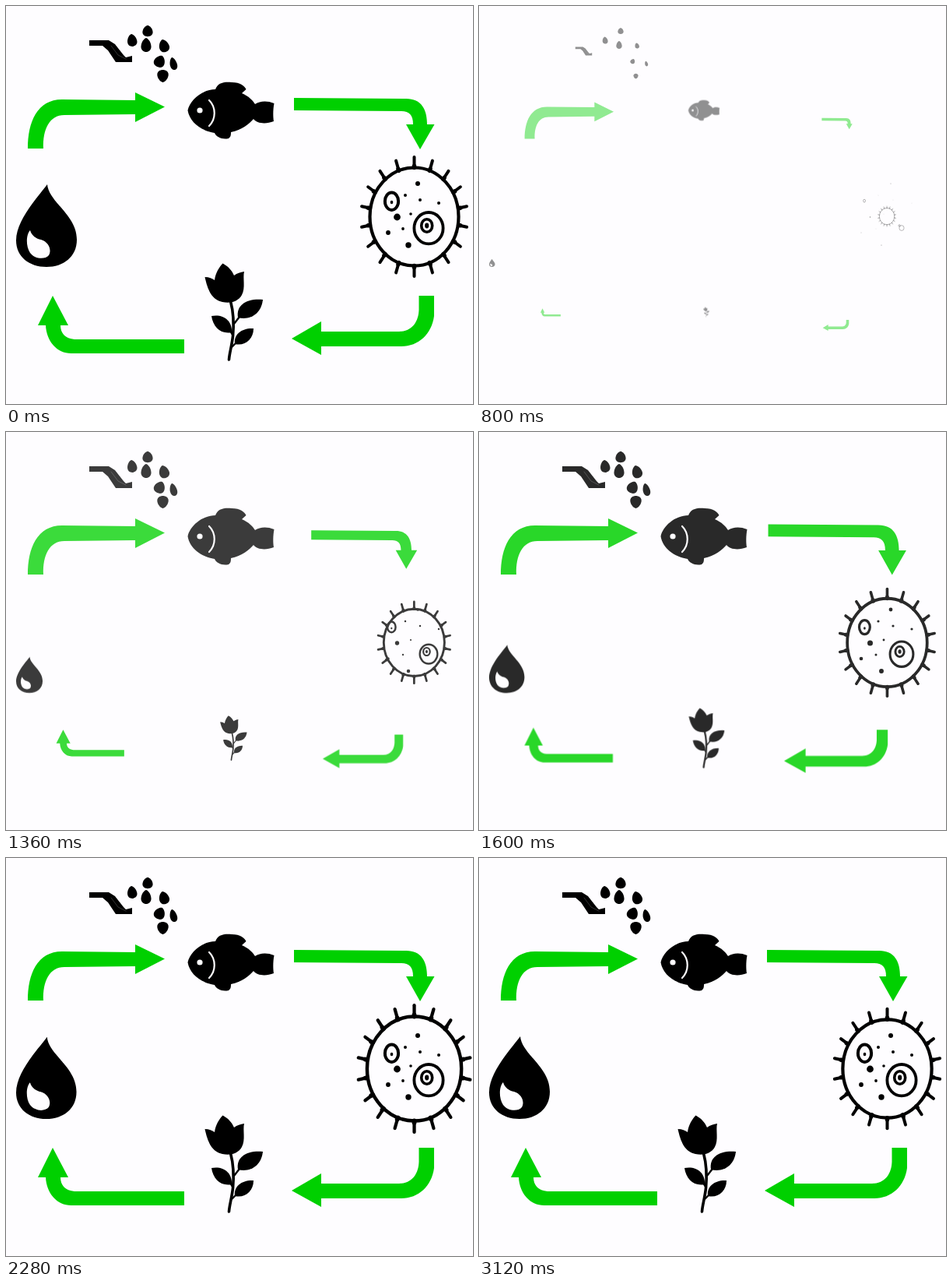
Write an HTML page that moves like this. It is 600x511 px and loops after 3.16 s.

```html
<!DOCTYPE html>
<html lang="en">
<head>
<meta charset="utf-8">
<title>Cycle of fish, microbes, plants and water</title>
<style>
  html, body { margin: 0; width: 100%; height: 100%; overflow: hidden; background: #fefdff; }
  svg { display: block; width: 100vw; height: 100vh; }
</style>
</head>
<body>
<svg viewBox="0 0 600 511"><g id="scene"></g></svg>
<script>
const LOOP = 3160, STEP = 40, START = 640;
const GREEN = '#00d000', BLACK = '#000', PAPER = '#fefdff';
const scene = document.getElementById('scene');
const parts = [];

// Value at time t on a list of [time, value] points.
function track(points, t) {
  let i = 1;
  while (i < points.length - 1 && t > points[i][0]) i++;
  const [t0, a] = points[i - 1], [t1, b] = points[i];
  const k = Math.min(1, Math.max(0, (t - t0) / (t1 - t0)));
  return a + (b - a) * k;
}

// Scale from `from` at START up to 1 at `end`; full size before START.
const grow = (from, end) => t => t < START ? 1 : track([[START, from], [end, 1]], t);

function add(x, y, scale, markup) {
  const g = document.createElementNS('http://www.w3.org/2000/svg', 'g');
  g.innerHTML = markup;
  scene.append(g);
  parts.push({ g, x, y, scale });
}

const shape = (d, fill = BLACK) => `<path d="${d}" fill="${fill}" fill-rule="evenodd"/>`;
const line = (d, width, color = BLACK) =>
  `<path d="${d}" fill="none" stroke="${color}" stroke-width="${width}" stroke-linecap="round"/>`;
const oval = (x, y, rx, ry, width = 0) =>
  `<ellipse cx="${x}" cy="${y}" rx="${rx}" ry="${ry}" ` +
  (width ? `fill="none" stroke="${BLACK}" stroke-width="${width}"/>` : `fill="${BLACK}"/>`);

// Arrows
add(115.5, 147, grow(.3, 960), shape(
  'M28 183C28 149 40 120 72 120L166 121V111L204 129.5L166 149V139L75 140C56 140 47 158 48 183Z', GREEN));
add(460, 151, grow(.065, 1618), shape(
  'M370 118L514 119C534 119 541 133 541 152H550.5L532 184L514 152H523C523 140 518 135 508 135L370 134Z', GREEN));
add(458.5, 410, grow(.075, 2000), shape(
  'M530.5 372H550V398C547 421 530 437 508 437H405V448L367 427L405 405V418H505C522 418 530 405 530.5 390Z', GREEN));
add(85, 391, grow(.045, 2280), shape(
  'M60 372L80 410H70C70 420 76 427 88 428H229V446H84C65 446 52 430 51 410H41Z', GREEN));

// Hand and feed
add(134.5, 58, grow(.19, 1288),
  shape('M107 44H132L140 49L151 63L154 66L162 64V72H141L131 57L124 51H107Z') +
  line('M135 51L144 63L154 68', .5, '#666'));

const fast = grow(.22, 1005), slow = grow(.24, 1318);
[[182, 32, 6.6, 7.2, 0, fast], [162, 44, 6.2, 8, -8, fast], [180, 50, 6.5, 9, 0, fast],
 [203, 51, 6.5, 8.4, -15, slow], [197.5, 71, 7, 7.8, 25, slow],
 [215, 74, 4.6, 8.2, -14, slow], [201.5, 90, 7.2, 8, 180, slow]
].forEach(([x, y, rx, ry, turn, scale]) => add(x, y, scale,
  `<g transform="translate(${x} ${y}) rotate(${turn}) scale(${rx} ${ry})">` +
  shape('M0-1C.5-.9 1-.3 1 .25C1 .75 .5 1 0 1C-.5 1-1 .75-1 .25C-1-.3-.5-.9 0-1Z') + '</g>'));

// Fish
add(289, 134, grow(.11, 1205),
  shape('M233.5 134C236 121 252 107 269 107C272 99 279 97 290 98C301 98 307 103 308.5 107L303 112' +
    'C312 116 317 121 320 126C326 122 335 121 344.5 125C343 133 343 142 344 148C334 152 322 151 318 145' +
    'C313 151 303 159 289 162C289 165 289 168 286 170C278 172 270 168 268 163C250 160 236 149 233.5 134Z') +
  `<circle cx="249" cy="134" r="3.6" fill="${PAPER}"/>` +
  line('M261 121C270 130 270 145 261 154', 2.2, PAPER));

// Water drop, growing from its lower left corner
add(13, 335, grow(0, 2290), shape(
  'M53 229C55 252 91 268 91 300C91 322 74 335 52 335C30 335 13 322 13 301C13 274 43 243 53 229Z' +
  'M31 288C33 295 39 299 45 300C55 303 59 313 55 320C50 326 37 325 31 317C25 308 26 293 31 288Z'));

// Flower
add(292, 393, grow(0, 2200),
  shape('M255.5 348C261 348 265 350 268 352C269 343 274 335 278.5 330.5C285 334 290 339 293 346' +
    'C297 343 301 342 306 341C304 349 308 362 303 371C298 380 288 382 278 380C264 377 259 364 255.5 348Z') +
  line('M288.5 379C292 392 293 408 291.5 424C290 437 287 446 286.5 454', 3.6) +
  shape('M298 400C295 383 311 375 330 377C328 395 314 404 298 400Z') +
  shape('M264 398C278 395 291 403 290 419C276 422 266 412 264 398Z') +
  shape('M294 434C292 421 304 413 318 414C318 428 307 437 294 434Z') +
  line('M300 399L293 408M288 417L291.5 423M296 432L290 438', 2.4));

// Microbe: the spiked ring overshoots and settles, inner parts simply grow
const ringTrack = [[START, .03], [800, .17], [1120, .47], [1600, .9], [1840, 1.1],
  [1960, 1.09], [2680, 1.03], [LOOP, 1]];
const ringScale = t => t < START ? track([[0, 1], [480, .985]], t) : track(ringTrack, t);
let spikes = '';
for (let i = 0; i < 18; i++) {
  const a = i * Math.PI / 9, sx = Math.sin(a), sy = -Math.cos(a);
  const at = (rx, ry) => `${524.5 + rx * sx} ${270.5 + ry * sy}`;
  spikes += line(`M${at(58, 63)}L${at(68.5, 76.5)}`, 4) + line(`M${at(58, 63)}L${at(60, 65)}`, 5.5);
}
add(524, 270, ringScale, oval(524.5, 270.5, 57, 63, 4.2) + spikes);

const inner = grow(.04, 1850);
add(495, 250, inner, oval(495.5, 250.7, 8.6, 11.2, 4));
add(495, 252, inner, oval(495.5, 252, 1.8, 2.2));
add(543, 285, inner, oval(543, 285.2, 18.6, 20.2, 3.8));
add(540, 282, inner, oval(540.7, 282, 7, 8.2, 3.6) + oval(540.7, 282, 2.6, 3.4));
[[529, 228, 3], [513, 243, 2], [532, 249, 2], [556, 253, 2], [502.5, 271, 4.4],
 [520, 267, 1.8], [491, 291, 2.9], [510, 286, 1.9], [517, 307, 3.7]
].forEach(([x, y, r]) => add(x, y, inner, oval(x, y, r, r)));

const fade = [[START, .27], [800, .435], [1120, .7], [1600, .84], [1960, .91], [2280, 1]];

function draw(now) {
  const t = Math.floor(now % LOOP / STEP) * STEP;
  scene.setAttribute('opacity', t < START ? 1 : track(fade, t));
  for (const { g, x, y, scale } of parts)
    g.setAttribute('transform', `translate(${x} ${y}) scale(${scale(t)}) translate(${-x} ${-y})`);
}

const begin = performance.now();
function tick() {
  draw(performance.now() - begin);
  requestAnimationFrame(tick);
}
tick();
</script>
</body>
</html>
```
